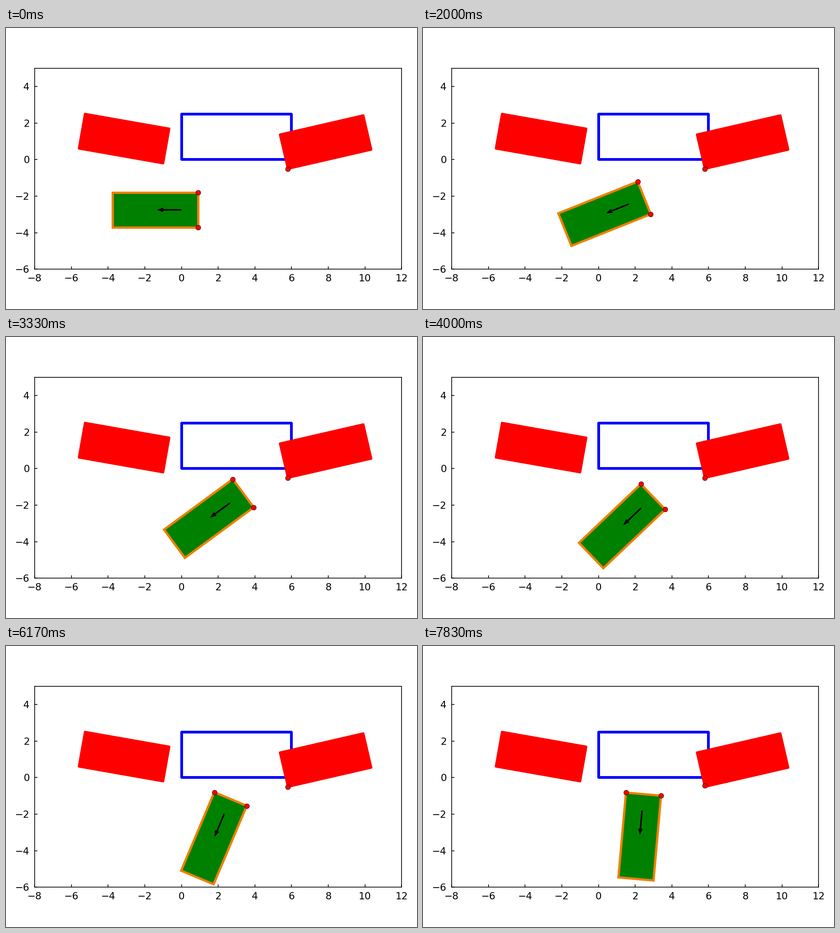
Animation of 903x620 px, one loop 8 s. Source, as a matplotlib script:

```python
import numpy as np
import matplotlib.pyplot as plt
from matplotlib.animation import FuncAnimation
from matplotlib.patches import FancyArrow, Polygon, Rectangle

W, H, DPI = 903, 620, 72  # at 72 dpi one point is one pixel
FRAMES, LOOP = 400, 8000
TICK = LOOP / FRAMES
STEPS_PER_SECOND = 6  # the car moves in visible steps

# car: overhangs measured from the rear axle, turning radius of every arc
FRONT, REAR, HALF = 3.76, 0.9, 0.96
LENGTH = FRONT + REAR
RADIUS = 4.454
START = np.array([0, -2.75])
# headings (degrees) at which the car swaps reverse and forward gear
SWITCHES = [37.28, 51.77, 64.37, 69.25, 76.3, 81.8]


def axes_of(deg):
    """Unit vectors along and across a body turned by deg."""
    a = np.radians(deg)
    return np.array([np.cos(a), np.sin(a)]), np.array([-np.sin(a), np.cos(a)])


def heading(step):
    return np.interp(step, [0, 16, 37, 47], [0, 29.15, 67.2, 84.95])


def axle(deg):
    """Rear axle after alternating reverse and forward arcs up to deg."""
    pos, gear, a = START.copy(), 1, 0
    for stop in SWITCHES + [180]:
        b = min(stop, deg)
        pos += gear * RADIUS * (axes_of(a)[1] - axes_of(b)[1])
        if b == deg:
            return pos
        gear, a = -gear, b


def car_corners(pos, deg):
    u, n = axes_of(deg)
    back, front = pos + REAR * u, pos - FRONT * u
    return np.array([back + HALF * n, back - HALF * n,
                     front - HALF * n, front + HALF * n])


def parked(corner, deg, side):
    """Parked car from its lower corner; side is the direction of its length."""
    u, n = axes_of(deg)
    c, along, up = np.array(corner), side * LENGTH * u, 2 * HALF * n
    return np.array([c, c + along, c + along + up, c + up])


def nearest_on_side(p, a, b):
    d = b - a
    return a + np.clip(np.dot(p - a, d) / np.dot(d, d), 0, 1) * d


fig = plt.figure(figsize=(W / DPI, H / DPI), dpi=DPI, facecolor="white")
left, top, unit = 62.97, 88.8, 40.32
width, height = 20 * unit, 11 * unit
ax = fig.add_axes([left / W, 1 - (top + height) / H, width / W, height / H])
ax.set(xlim=(-8, 12), ylim=(-6, 5),
       xticks=range(-8, 13, 2), yticks=range(-6, 5, 2))
ax.tick_params(direction="in", length=6.3, width=1.6, pad=11, labelsize=21.6)
for spine in ax.spines.values():
    spine.set_linewidth(1.6)

ax.add_patch(Rectangle((0, 0), 6, 2.5, fill=False, ec="blue", lw=6,
                       joinstyle="round", zorder=1))
left_car = parked((-1, -0.2), -10, -1)
right_car = parked((5.8, -0.5), 13, 1)
for shape in (left_car, right_car):
    ax.add_patch(Polygon(shape, fc="red", ec="red", lw=5,
                         joinstyle="round", zorder=2))

car = ax.add_patch(Polygon(car_corners(START, 0), fc="green", ec="#f08000",
                           lw=5, joinstyle="miter", zorder=2.1))
arrow = ax.add_patch(FancyArrow(0, 0, -1, 0, width=0.08, head_width=0.24,
                                head_length=0.35, color="black", lw=0, zorder=2.2))
dots, = ax.plot([], [], "o", ms=10.7, mfc="red", mec="black", mew=0.8, zorder=2.3)


def update(i):
    # a step shows from the tick nearest to its start
    step = int((i * TICK + 0.75 * TICK) * STEPS_PER_SECOND / 1000)
    deg = heading(step)
    pos = axle(deg)
    corners = car_corners(pos, deg)
    car.set_xy(corners)
    u = axes_of(deg)[0]
    arrow.set_data(x=pos[0], y=pos[1], dx=-u[0], dy=-u[1])
    near = nearest_on_side(corners[1], right_car[0], right_car[3])
    dots.set_data(*np.array([corners[0], corners[1], near]).T)
    return car, arrow, dots


anim = FuncAnimation(fig, update, frames=FRAMES, interval=TICK,
                     init_func=lambda: update(0), repeat=True, repeat_delay=0)
plt.show()
```
